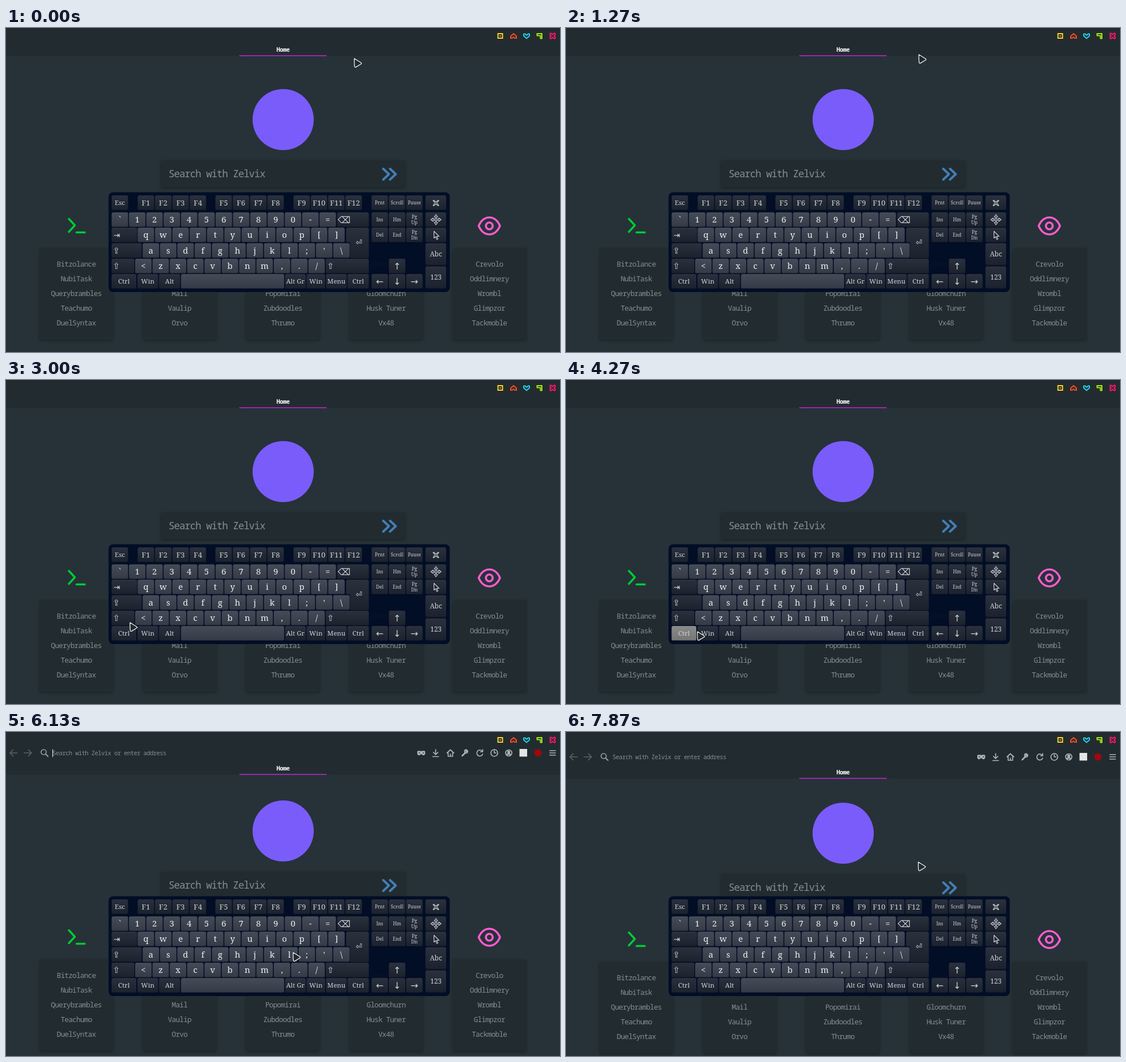
An HTML page for the animation above (8 s loop, 978 by 573 pixels).

```html
<!DOCTYPE html>
<html lang="en">
<head>
<meta charset="utf-8">
<title>Start page with on-screen keyboard</title>
<style>
html, body { margin: 0; width: 100%; height: 100%; overflow: hidden; background: #263238; }
svg { display: block; }
text { white-space: pre; }
.mono { font-family: "Noto Sans Mono", "DejaVu Sans Mono", monospace; }
.link { font-size: 12.8px; letter-spacing: -.8px; fill: #868e91; text-anchor: middle; }
.cap { font-family: "Noto Serif", "DejaVu Sans", serif; text-anchor: middle; }
.line { fill: none; stroke-linecap: round; stroke-linejoin: round; }
.card { fill: #222c30; filter: drop-shadow(0 2px 2.5px rgba(0, 0, 0, .32)); }

#header, #page, #tools, #caret, #held { animation: 8s step-end infinite; }
#header { animation-name: header; }
#page { animation-name: page; }
#tools { animation-name: tools; }
#caret { animation-name: caret; }
#held { animation-name: held; }
#pointer { animation: pointer 8s step-end infinite; }

@keyframes header { 0% { transform: none; } 76.625% { transform: translateY(26px); } 78.75%, to { transform: translateY(33px); } }
@keyframes page { 0% { transform: none; } 76.625% { transform: translateY(13px); } 78.75%, to { transform: translateY(17px); } }
@keyframes tools { 0% { opacity: 0; } 76.625%, to { opacity: 1; } }
@keyframes caret { 0% { opacity: 0; } 76.625% { opacity: 1; } 90.875%, to { opacity: 0; } }
@keyframes held { 0% { opacity: 0; } 47.5% { opacity: 1; } 76.625%, to { opacity: 0; } }

/* Each moving leg starts one step before its first visible change. */
@keyframes pointer {
  0% { transform: translate(614px, 53px); }
  .375% { transform: translate(614px, 56px); }
  6.19% { transform: translate(614px, 56px); animation-timing-function: steps(5); }
  8.4% { transform: translate(628px, 70px); animation-timing-function: steps(5); }
  10.6% { transform: translate(651px, 61px); animation-timing-function: steps(5); }
  12.8% { transform: translate(647px, 38px); animation-timing-function: steps(6); }
  15.875% { transform: translate(622px, 46px); }
  27.5% { transform: translate(622px, 46px); animation-timing-function: steps(3); }
  31.25% { transform: translate(545px, 118px); animation-timing-function: steps(3); }
  35% { transform: translate(308px, 350px); animation-timing-function: steps(2); }
  37.5% { transform: translate(218px, 428px); }
  38.75% { transform: translate(214px, 438px); animation-timing-function: steps(3); }
  42.5% { transform: translate(210px, 450px); }
  48.75% { transform: translate(210px, 450px); animation-timing-function: steps(2); }
  51.6% { transform: translate(211px, 449px); }
  53.375% { transform: translate(231px, 444px); animation-timing-function: steps(3); }
  57.5% { transform: translate(385px, 417px); animation-timing-function: steps(3); }
  61.625% { transform: translate(500px, 390px); }
  63.375% { transform: translate(503px, 390px); }
  64.625% { transform: translate(506px, 389px); }
  83.625% { transform: translate(506px, 389px); animation-timing-function: steps(4); }
  89.125% { transform: translate(499px, 390px); }
  93.75% { transform: translate(514px, 357px); }
  95.375% { transform: translate(538px, 303px); }
  97.125% { transform: translate(575px, 268px); }
  98.375%, to { transform: translate(621px, 229px); }
}
</style>
</head>
<body>
<svg width="978" height="573" viewBox="0 0 978 573">
  <defs>
    <linearGradient id="mod" x2="0" y2="1"><stop stop-color="#2a313d"/><stop offset="1" stop-color="#1b222e"/></linearGradient>
    <linearGradient id="lit" x2="0" y2="1"><stop stop-color="#454b57"/><stop offset="1" stop-color="#343b47"/></linearGradient>
    <linearGradient id="grey" x2="0" y2="1"><stop stop-color="#8a8a89"/><stop offset="1" stop-color="#757574"/></linearGradient>
  </defs>
  <rect width="978" height="573" fill="#263238"/>

  <g id="page">
    <circle cx="489.300" cy="162" r="54" fill="#7a5cfa"/>
    <rect class="card" x="274" y="234" width="430.500" height="47.500" rx="3"/>
    <text class="mono" x="287" y="264" font-size="17.600" letter-spacing="-1.1" fill="#858d90">Search with Zelvix</text>
    <path class="line" d="M666 249l10 9.500-10 9.500M678 249l10 9.500-10 9.500" stroke="#427fb6" stroke-width="4"/>
    <path class="line" d="M111 337.500l10.500 11.500-10.500 11.500M124.500 361.500h14.500" stroke="#0c3" stroke-width="3.500"/>
    <g class="line" stroke="#ff5cd0" stroke-width="3.600">
      <path d="M834.500 350C843 330 863.500 330 872 350C863.500 370 843 370 834.500 350Z"/>
      <circle cx="853.200" cy="350" r="6"/>
    </g>
  </g>

  <g id="header">
    <rect y="-33" width="978" height="82.500" fill="#222c30"/>
    <text class="mono" x="489" y="42" font-size="10.500" font-weight="700" letter-spacing="-.55" fill="#fff" text-anchor="middle">Home</text>
    <rect x="412" y="48" width="154" height="2" fill="#9c27b0"/>
    <g id="tools" class="line" stroke="#adb5b8" stroke-width="1.700">
      <path d="M20 11H7m5.500-5.500L7 11l5.500 5.500M32 11h13m-5.500-5.500L45 11l-5.500 5.500" stroke="#56636a"/>
      <path d="M70 13l4 4" stroke="#929b9f" stroke-width="2.200"/><circle cx="66.500" cy="9.500" r="4.500" stroke="#929b9f"/>
      <text class="mono" x="82" y="15" font-size="10.600" letter-spacing="-.62" fill="#858e92" stroke="none">Search with Zelvix or enter address</text>
      <path id="caret" d="M82.500 5v13" stroke="#fff" stroke-width="1"/>
      <path fill="#adb5b8" stroke="none" fill-rule="evenodd" d="M726 8q3.500-1.500 7 0 3.500-1.500 7 0v4q-1 4-4 3l-3-2-3 2q-3 1-4-3zm2 2.500q2-1.500 3.500 1-2.500 1-3.500-1m7 1q1.500-2.500 3.500-1-1 2-3.500 1"/>
      <path d="M758.500 5v9m-4-4l4 4 4-4M753.500 17.500h10"/>
      <path d="M778.500 11l6-5.500 6 5.500M780.500 10v7h8v-7M784.500 17v-4"/>
      <path d="M805.500 16l5.500-5.500" stroke-width="2.600"/><path d="M815 7l-2.500 2-1-1 2-2.500q-4-1-4 3 0 3 3 3 3.500-1 2.500-4.500"/>
      <path d="M841 8.500a5.300 5.300 0 1 0 .5 4.500M841.500 5v4h-4"/>
      <circle cx="862" cy="11" r="6"/><path d="M862 7v4h3"/>
      <circle cx="887.500" cy="11" r="5.500"/><circle cx="887.500" cy="9.500" r="1.800" fill="#adb5b8"/><path d="M884 14q3.500-2 7 0" stroke-width="2.500"/>
      <rect x="906.500" y="4" width="13.500" height="13.500" fill="#e4e6e6" stroke="none"/>
      <circle cx="939" cy="11" r="6.500" fill="#a3060e" stroke="none"/>
      <path d="M960 7h10M960 11h10M960 15h10"/>
    </g>
  </g>

  <g class="line" stroke-width="2">
    <path d="M868.500 10h8v8h-8z" stroke="#ffd02b" stroke-linejoin="miter"/><path d="M871.500 13h2v2h-2z" fill="#ffd02b"/>
    <path d="M891 14.500l5-4.500 5 4.500v3.500h-2.500l-2.500-2-2.500 2H891z" stroke="#ff4a24"/>
    <path d="M914 10.500h2.500l2.500 2.500 2.500-2.500h2.500v3.500l-5 4.500-5-4.500z" stroke="#21cfe0"/>
    <path d="M937.500 10h8.500v8.500h-2.500v-5h-6z" stroke="#a5e814"/>
    <path d="M960.500 9.500h2.500l2 2 2-2h2.500v2.500l-2 2 2 2v2.500h-2.500l-2-2-2 2h-2.500v-2.500l2-2-2-2z" stroke="#f5146a"/>
  </g>

  <g id="keyboard">
    <rect x="181" y="290.500" width="602.500" height="176.500" rx="8" fill="#000c26" fill-opacity=".94"/>
  </g>
  <g id="icons" class="line" stroke="#d3d7dc" stroke-width="1.100">
    <path d="M755 304.500l4 3.500 4-3.500 1 1-3.500 4 3.500 4-1 1-4-3.500-4 3.500-1-1 3.500-4-3.500-4z"/>
    <path d="M758 338v-4h-2l3-4 3 4h-2v4h4v-2l4 3-4 3v-2h-4v4h2l-3 4-3-4h2v-4h-4v2l-4-3 4-3v2z"/>
    <path d="M755.500 359.500v12l3-2.500 2 5 2-1-2-4.500h4z"/>
  </g>

  <path id="pointer" class="line" d="M1 1q-.4 8 .5 14.500.8 1.500 2.300.6L13 10.500q1-1 0-2z" fill="#222a2f" stroke="#f4f4f4" stroke-width="1.300" style="fill:#222a2f"/>
</svg>
<script>
const byId = id => document.getElementById(id);
const page = byId('page'), board = byId('keyboard');

function add(parent, tag, attrs, text) {
  const node = document.createElementNS('http://www.w3.org/2000/svg', tag);
  for (const name in attrs) node.setAttribute(name, attrs[name]);
  if (text) node.textContent = text;
  parent.append(node);
  return node;
}

// Link cards; blank entries stay hidden behind the keyboard.
const cards = [
  ['Bitzolance', 'NubiTask', 'Querybrambles', 'Teachumo', 'DuelSyntax'],
  ['', '', 'Mail', 'Vaulip', 'Orvo'],
  ['', '', 'Popomirai', 'Zubdoodles', 'Thrumo'],
  ['Humelio', '', 'Gloomchurn', 'Husk Tuner', 'Vx48'],
  ['Crevolo', 'Oddlimnery', 'Wrombl', 'Glimpzor', 'Tackmoble']
];
cards.forEach((links, col) => {
  const x = 59.5 + col * 182.3;
  add(page, 'rect', { class: 'card', x, y: 389, width: 129.5, height: 162, rx: 4 });
  links.forEach((name, i) =>
    add(page, 'text', { class: 'mono link', x: x + 64.5, y: 422.3 + i * 25.8 }, name));
});

function caption(parent, x, y, text, size, fill) {
  const lines = text.split('|');
  lines.forEach((line, i) => add(parent, 'text', {
    class: 'cap', x, y: y + size * .36 + (i - (lines.length - 1) / 2) * 10.5, 'font-size': size, fill
  }, line));
}

function key(x, y, w, text = '', size = 11.6, skin = 'mod', textX = x + w / 2, h = 26, parent = board) {
  add(parent, 'rect', { x, y, width: w, height: h, rx: 3, fill: `url(#${skin})` });
  add(parent, 'path', { d: `M${x + 2} ${y + h - .5}h${w - 4}`, stroke: '#10151e', 'stroke-opacity': .5 });
  caption(parent, textX, y + h / 2, text, size, skin === 'lit' ? '#eef0f2' : '#cfd3d8');
}

const run = (labels, x, y, size = 15, skin = 'lit') =>
  labels.split(' ').forEach((label, i) => key(x + i * 30.58, y, 29, label, size, skin));

key(186.5, 296, 29, 'Esc');
run('F1 F2 F3 F4', 232.5, 296, 13, 'mod');
run('F5 F6 F7 F8', 369.7, 296, 13, 'mod');
run('F9 F10 F11 F12', 507.5, 296, 13, 'mod');

run('` 1 2 3 4 5 6 7 8 9 0 - =', 186.5, 326);
key(584.5, 326, 56, '⌫', 16, 'mod', 597);

key(186.5, 353, 45, '⇥', 14, 'mod', 195.5);
run('q w e r t y u i o p [ ]', 232.5, 353);
add(board, 'path', {
  d: 'M604 353h33.500q3 0 3 3v48q0 3-3 3h-27q-3 0-3-3v-25h-4q-3 0-3-3v-20q0-3 3-3z', fill: 'url(#mod)'
});
caption(board, 623, 379, '⏎', 14, '#cfd3d8');

key(186.5, 380.5, 53, '⇪', 15, 'mod', 195);
run("a s d f g h j k l ; ' \\", 241.3, 380.5);

key(186.5, 408, 40, '⇧', 15, 'mod', 195);
run('< z x c v b n m , . /', 228, 408);
key(564.5, 408, 76, '⇧', 15, 'mod', 573);

const bottom = [
  [186.5, 43.5, 'Ctrl'], [232, 36.5, 'Win'], [270, 37.5, 'Alt'], [492.5, 36.5, 'Alt Gr'],
  [530.5, 33, 'Win'], [565, 36.5, 'Menu'], [603, 37.5, 'Ctrl']
];
bottom.forEach(([x, w, label]) => key(x, 435, w, label));
key(309, 435, 182, '', 12, 'lit');

run('Prnt Scroll Pause', 645.3, 296, 8.2, 'mod');
run('Ins Hm Pg|Up', 645.3, 326, 8.2, 'mod');
run('Del End Pg|Dn', 645.3, 353, 8.2, 'mod');
run('↑', 675.9, 408, 16, 'mod');
run('← ↓ →', 645.3, 435, 16, 'mod');

[296, 326, 353].forEach(y => key(740.5, y, 36.5));
key(740.5, 380.5, 36.5, 'Abc', 12, 'mod', 759, 39);
key(740.5, 421.5, 36.5, '123', 12, 'mod', 759, 39);

key(186.5, 435, 43.5, 'Ctrl', 11.6, 'grey', 208.2, 26, add(board, 'g', { id: 'held' }));
</script>
</body>
</html>
```
